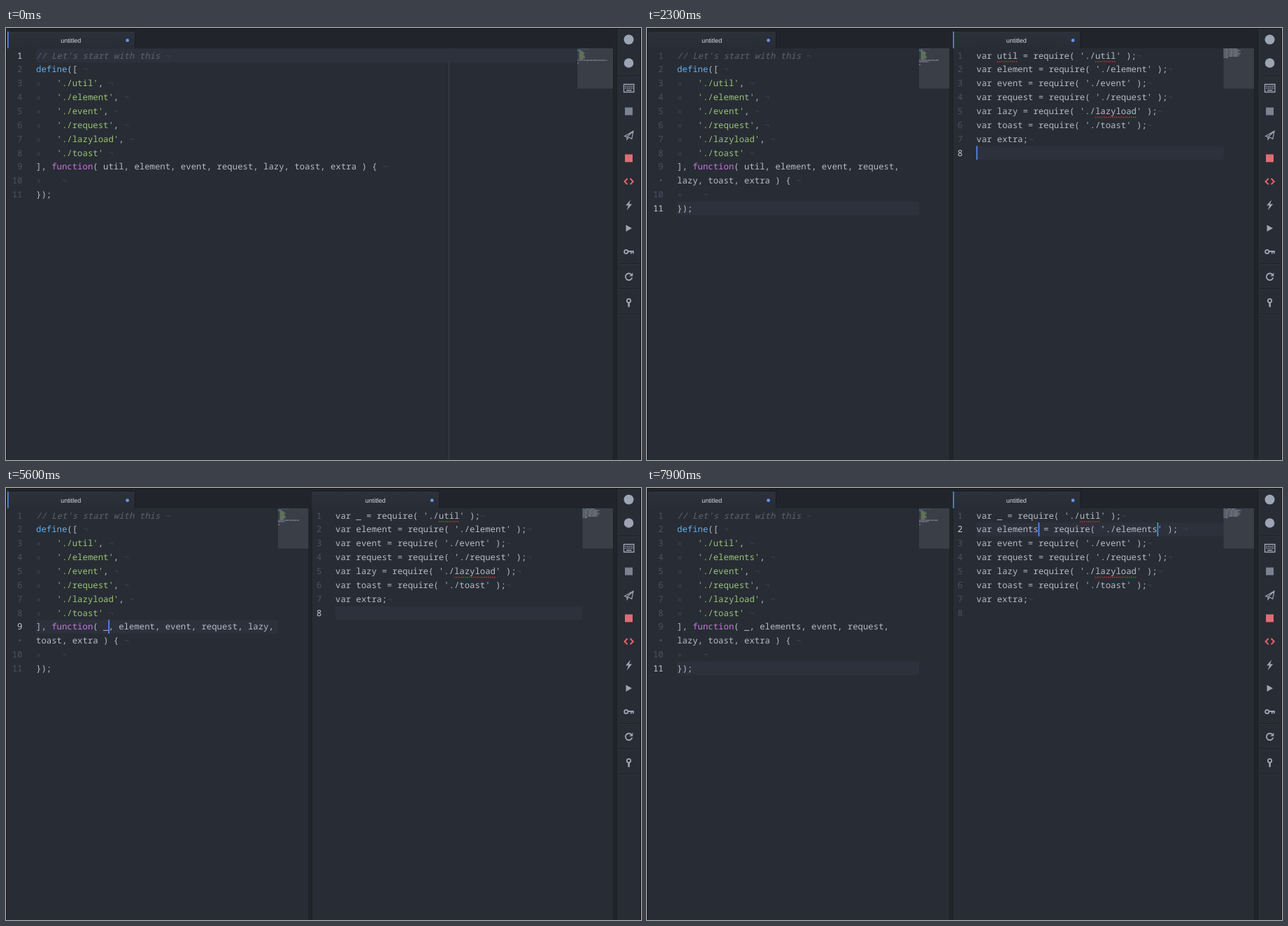
Recreate the animation shown at these times as an HTML page. Size 908 by 617 pixels, loop 8000 ms.

```html
<!DOCTYPE html>
<html lang="en">
<head>
<meta charset="utf-8">
<title>Editor</title>
<style>
html, body { margin: 0; width: 100%; height: 100%; overflow: hidden; background: #282c34; }
svg { display: block; position: absolute; left: 0; top: 0; }
text { white-space: pre; text-rendering: geometricPrecision; }
.code { font: 12.32px "Noto Sans Mono", "DejaVu Sans Mono", monospace; fill: #b4bbc8; }
.num { text-anchor: end; fill: #4b5263; }
.num.on { fill: #c8cdd6; }
.tab { font: 9px "Liberation Sans", Arial, sans-serif; fill: #d7dae0; text-anchor: middle; }
.comment { fill: #5c6370; font-style: italic; }
.string { fill: #98c379; }
.call { fill: #61afef; }
.keyword { fill: #c678dd; }
.ghost { fill: #3f444f; }
.icon { fill: #9da5b4; }
.line { fill: none; stroke: #9da5b4; stroke-width: 1.8; }
.red { fill: #e06c75; }
</style>
</head>
<body>
<svg width="908" height="617" viewBox="0 0 908 617">
  <defs>
    <linearGradient id="tabFill" x2="0" y2="1">
      <stop stop-color="#2d313b"/><stop offset="1" stop-color="#282c34"/>
    </linearGradient>
  </defs>
  <rect width="908" height="617" fill="#282c34"/>
  <g id="panes"></g>
  <rect x="868.5" width="4.5" height="617" fill="#21252b"/>
  <path d="M868.5 29V617M873.5 0V617" stroke="#1c1f25"/>
  <g id="hover"></g>
  <path d="M877 68.5h28M877 336.5h28M877 372.5h28M877 408.5h28" stroke="#1e2127"/>
  <path d="M877 69.5h28M877 337.5h28M877 373.5h28M877 409.5h28" stroke="#2f343d"/>
  <g class="icon">
    <circle cx="890.5" cy="16.5" r="7"/>
    <circle cx="890.5" cy="50" r="6.8"/>
    <path class="line" style="stroke-width:1.3" d="M883.5 80.5h14.4v11h-14.4z"/>
    <path class="line" style="stroke-width:1.5" stroke-dasharray="1.5 1" d="M885.5 83.5h11M885.5 86h11"/>
    <path d="M887 88.2h7.5v1.5H887z"/>
    <rect x="885" y="113.500" width="11" height="11" fill="#7b8290"/>
    <path class="line" style="stroke-width:1.2" d="M884.500 154.500L897 147.200L894.800 158.300L890.300 156L888 159.200V155.800L897 147.200L888 155.800Z"/>
    <rect class="red" x="885" y="180.500" width="11" height="11"/>
    <path class="line" style="stroke:#e8636c;stroke-width:2" d="M888.600 215l-4.100 4.200 4.100 4.200M892.600 215l4.100 4.200-4.100 4.200"/>
    <path d="M893 245.500L886 253.500H890L887.600 260.500L895.200 251.500H891Z"/>
    <path d="M886.500 281.200L895 286L886.500 290.800Z"/>
    <path class="line" d="M889.500 319h8.300M893.800 319v3.600M896.800 319v3.200"/>
    <circle class="line" cx="886.700" cy="319.500" r="2.600"/>
    <path class="line" d="M894.300 352.200A4.800 4.800 0 1 0 895.300 356.500"/>
    <path d="M896.300 349.500V354.600H891.200Z"/>
    <circle class="line" cx="890.500" cy="389.500" r="2.700"/>
    <path d="M889.300 391.500h2.600v7h-2.600z"/>
  </g>
  <path d="M0 .5H908M.5 0V617M907.500 0V617" stroke="#15171b"/>
</svg>
<script>
const LOOP = 8000, CHAR = 7.392, ROW = 19.85, TOP = 29.4, WRAP = 46;

// Each entry changes part of the state from its time on.
const timeline = [
  [0, { split: false, hover: 0, focus: 'left', leftLine: 1, rightLine: 8, first: 'util', rightFirst: 'util',
        second: 'element', rightSecond: 'element', gap: '', filled: false, spell: false, gear: false,
        cursor: null, cols: [], leftSel: [], rightSel: [] }],
  [300, { hover: 153 }],
  [400, { hover: 186 }],
  [500, { hover: 219, bright: true }],
  [800, { bright: false }],
  [1100, { split: true, focus: 'right', leftLine: 11 }],
  [1200, { filled: true, cursor: 'right', cols: [0] }],
  [1600, { hover: 0 }],
  [1700, { spell: true }],
  [2000, { cursor: null }],
  [2300, { cursor: 'right' }],
  [2600, { cursor: null }],
  [3000, { focus: 'left', leftLine: 9 }],
  [3100, { leftSel: [13, 4] }],
  [3800, { first: '_', leftSel: [], cursor: 'left', cols: [14] }],
  [4000, { rightFirst: '_' }],
  [4100, { cursor: null, gear: true }],
  [4400, { cursor: 'left' }],
  [4600, { gear: false }],
  [4700, { cursor: null }],
  [5000, { cursor: 'left' }],
  [5300, { cursor: null }],
  [5600, { cursor: 'left' }],
  [5800, { cursor: null }],
  [6100, { cursor: 'left' }],
  [6300, { cursor: null }],
  [6500, { rightLine: 2, cursor: 'right', cols: [8] }],
  [6600, { focus: 'right', rightSel: [4, 7], cursor: null }],
  [6900, { rightSel: [4, 7, 26, 7] }],
  [7300, { rightSecond: 'elements', gap: ' ', rightSel: [], cursor: 'right', cols: [12, 35] }],
  [7400, { second: 'elements', leftLine: 11 }],
  [7600, { cursor: null }],
  [7900, { cursor: 'right' }]
];

const rect = (x, y, w, h, fill, more = '') =>
  `<rect x="${x}" y="${y}" width="${w}" height="${h}" fill="${fill}" ${more}/>`;
const rowY = row => TOP + row * ROW;

const kinds = [
  ['comment', /^\/\//, '#5c6370'], ['string', /^'/, '#98c379'], ['call', /^define/, '#61afef'],
  ['keyword', /^function/, '#c678dd'], ['ghost', /^[»¬]/, 'none']
];

function tokens(text, plain) {
  const split = plain ? /([»¬])/ : /(\/\/[^¬]*|'[^']*'|define|function|[»¬])/;
  return text.split(split).filter(Boolean).map(part => {
    const kind = kinds.find(k => k[1].test(part) && (!plain || k[0] === 'ghost'));
    return { part, name: kind ? kind[0] : '', color: kind ? kind[2] : '#abb2bf' };
  });
}

function leftRows(s) {
  const files = ['util', s.second, 'event', 'request', 'lazyload', 'toast'];
  const head = `], function( ${s.first}, ${s.second}, event, request, lazy, toast, extra ) { ¬`;
  const cut = s.split ? head.lastIndexOf(' ', WRAP) : head.length;
  const rows = ["// Let's start with this ¬", 'define([ ¬',
    ...files.map((f, i) => `»   './${f}'${i < 5 ? ',' : ''} ¬`),
    head.slice(0, cut)].map((text, i) => ({ text, num: i + 1 }));
  if (s.split) rows.push({ text: head.slice(cut + 1), num: '•' });
  rows.push({ text: '»    ¬', num: 10 }, { text: '});', num: 11 });
  return rows;
}

function rightRows(s) {
  if (!s.filled) return [{ text: '', num: 1 }];
  const need = (name, file = name, gap = '') => `var ${name} = require( './${file}' );${gap}¬`;
  return [need(s.rightFirst, 'util'), need(s.rightSecond, s.rightSecond, s.gap), need('event'),
    need('request'), need('lazy', 'lazyload'), need('toast'), 'var extra;¬', '']
    .map((text, i) => ({ text, num: i + 1 }));
}

function minimap(rows, x, width, plain) {
  let out = rect(x, 29, width, 57.5, '#3a3e47');
  rows.forEach((row, i) => {
    let col = 0;
    for (const t of tokens(row.text, plain)) {
      if (t.name !== 'ghost')
        for (const word of t.part.matchAll(/\S+/g))
          out += rect(x + (col + word.index) * .65, 29.5 + i * 2, word[0].length * .65, 1.2, t.color,
            `opacity="${t.name === 'comment' ? .6 : .65}"`);
      col += t.part.length;
    }
  });
  return out;
}

function tab(x, focused) {
  return rect(x, 5, 182, 24.5, 'url(#tabFill)') +
    `<path d="M${x} 4.500h182.500V29" fill="none" stroke="#1a1c21"/>` +
    (focused ? rect(x, 5, 1.6, 24, '#568af2') : '') +
    `<text class="tab" x="${x + 90.7}" y="20.500">untitled</text>` +
    `<circle cx="${x + 171.6}" cy="17.700" r="2.400" fill="#6494ed"/>`;
}

function pane(p) {
  const row = p.rows.findIndex(r => r.num === p.line);
  let out = rect(p.x, 0, p.right - p.x, 29, '#21252b') + tab(p.x, p.focused);
  if (row >= 0 && !p.sel.length) out += rect(p.textX, rowY(row), p.mapX - p.textX, ROW, '#2c313c');
  for (let i = 0; i < p.sel.length; i += 2)
    out += rect(p.textX + p.sel[i] * CHAR, rowY(row), p.sel[i + 1] * CHAR, ROW, '#3e4451');
  p.rows.forEach((r, i) => {
    const y = rowY(i) + 14.2;
    const body = tokens(r.text, p.plain).map(t => `<tspan class="${t.name}">${t.part}</tspan>`).join('');
    out += `<text class="code num ${i === row ? 'on' : ''}" x="${p.textX - 19.500}" y="${y}">${r.num}</text>` +
      `<text class="code" xml:space="preserve" x="${p.textX}" y="${y}">${body}</text>`;
    if (p.spell)
      for (const m of r.text.matchAll(/util|lazyload/g)) {
        const x = p.textX + m.index * CHAR;
        out += `<path d="M${x} ${rowY(i) + 18.6}h${m[0].length * CHAR}" stroke="#d8302f" stroke-width="1.500" stroke-dasharray="1.500 1.500"/>`;
      }
  });
  for (const col of p.cols) out += rect(p.textX + col * CHAR - .2, rowY(row), 1.7, ROW, '#528bff');
  return out + minimap(p.rows, p.mapX, p.right - p.mapX, p.plain);
}

const gear = '<g transform="translate(427.500 37.300)" fill="none" stroke="#747a85">' +
  '<circle r="3.300" stroke-width="2.400"/>' +
  '<circle r="5" stroke-width="1.800" stroke-dasharray="1.963"/></g>';

function draw(s) {
  const colsOf = side => s.cursor === side ? s.cols : [];
  let out = s.split ? '' : rect(633, 29, 1, 588, '#3b4049');
  out += pane({ x: 2, textX: 43, mapX: s.split ? 389 : 817, right: s.split ? 433 : 868.5, rows: leftRows(s),
    line: s.leftLine, sel: s.leftSel, cols: colsOf('left'), focused: s.focus === 'left' });
  if (s.split)
    out += rect(433, 0, 4.5, 617, '#21252b') + '<path d="M433 29V617M437.500 29V617" stroke="#1c1f25"/>' +
      pane({ x: 437.500, textX: 471, mapX: 824.500, right: 868.500, rows: rightRows(s), plain: true, spell: s.spell,
        line: s.filled ? s.rightLine : 1, sel: s.rightSel, cols: colsOf('right'), focused: s.focus === 'right' });
  document.getElementById('panes').innerHTML = out + (s.gear ? gear : '');
  document.getElementById('hover').innerHTML = s.hover
    ? rect(875.5, s.hover - 14.5, 30.5, 30.5, s.bright ? '#353a45' : '#2e323b', 'rx="2" stroke="#1f2228"') : '';
}

const start = performance.now();
let shown = -1;
function tick() {
  const t = (performance.now() - start) % LOOP;
  const count = timeline.filter(e => e[0] <= t).length;
  if (count !== shown) {
    shown = count;
    draw(Object.assign({}, ...timeline.slice(0, count).map(e => e[1])));
  }
  requestAnimationFrame(tick);
}
tick();
</script>
</body>
</html>
```
